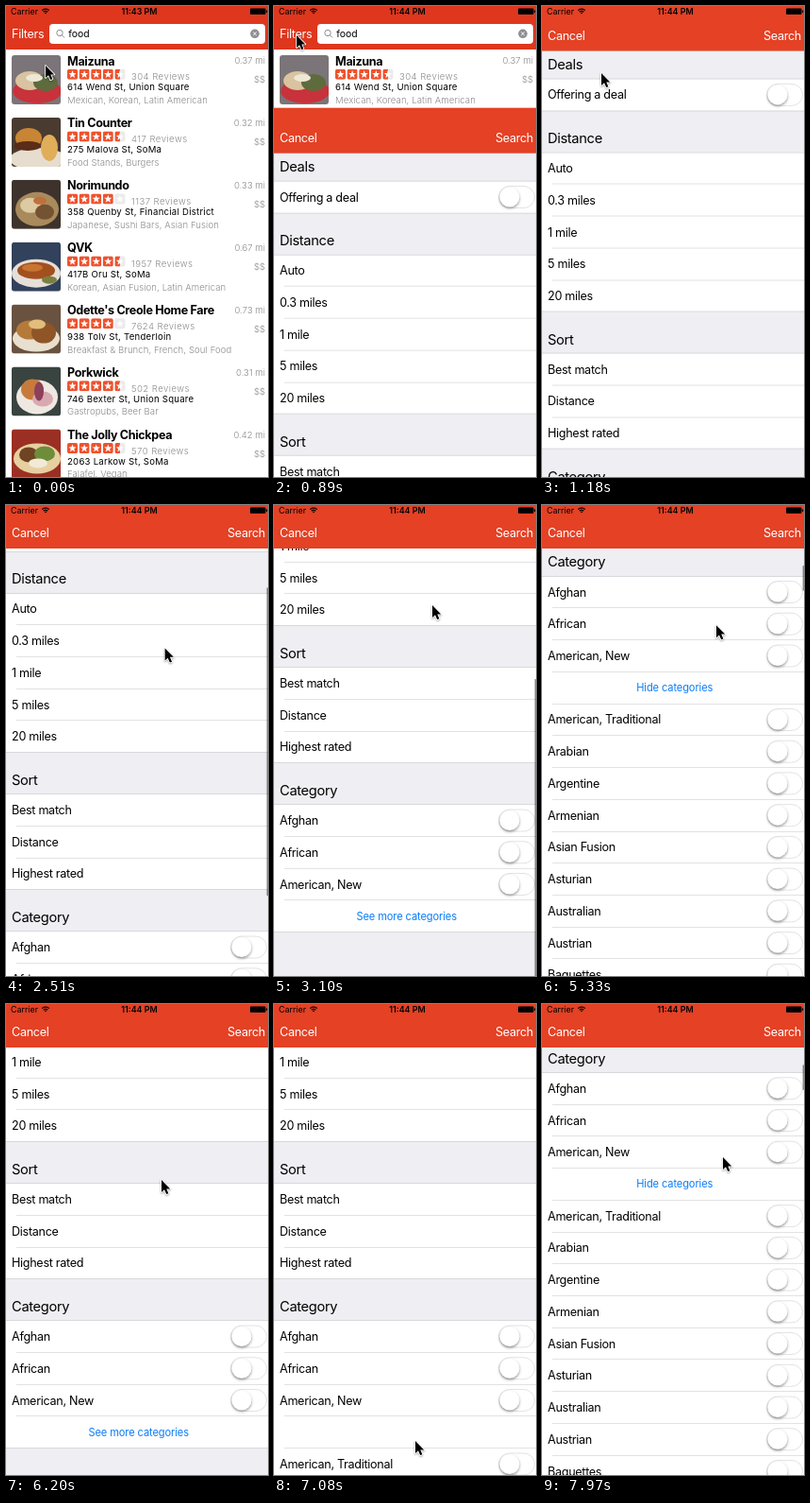
Animation, 278 px wide and 498 px high, one loop 8000 ms. Source, as an HTML page with a canvas:

```html
<!DOCTYPE html>
<html lang="en">
<head>
<meta charset="utf-8">
<title>Restaurant filters</title>
<style>
html, body { margin: 0; width: 100%; height: 100%; overflow: hidden; background: #fff; }
canvas { display: block; }
</style>
</head>
<body>
<canvas id="stage" width="278" height="498"></canvas>
<script>
const ctx = document.getElementById('stage').getContext('2d');
const W = 278, H = 498, LOOP = 8000, STEP = 147.4;
const BAR = 46, ROW = 33.73, HEAD = 43.9, PITCH = 65.9;
const REST = 176.1; // largest scroll offset while the categories are collapsed

const places = [
  ['Maizuna', '614 Wend St, Union Square', 'Mexican, Korean, Latin American', 4.5, 304, '0.37'],
  ['Tin Counter', '275 Malova St, SoMa', 'Food Stands, Burgers', 4.5, 417, '0.32'],
  ['Norimundo', '358 Quenby St, Financial District', 'Japanese, Sushi Bars, Asian Fusion', 4, 1137, '0.33'],
  ['QVK', '417B Oru St, SoMa', 'Korean, Asian Fusion, Latin American', 4.5, 1957, '0.67'],
  ["Odette's Creole Home Fare", '938 Tolv St, Tenderloin', 'Breakfast & Brunch, French, Soul Food', 4, 7624, '0.73'],
  ['Porkwick', '746 Bexter St, Union Square', 'Gastropubs, Beer Bar', 4.5, 502, '0.31'],
  ['The Jolly Chickpea', '2063 Larkow St, SoMa', 'Falafel, Vegan', 4.5, 570, '0.42'],
];

// Thumbnails: background, then ellipses as [x, y, rx, ry, colour]
const thumbs = [
  ['#7b7478', [27, 38, 26, 13, '#c8323a'], [19, 27, 15, 10, '#d9c3a0'], [36, 29, 13, 9, '#5d6b3d'], [24, 24, 9, 4, '#efe7d6']],
  ['#4a3b30', [28, 44, 30, 12, '#e6ddcf'], [18, 22, 14, 11, '#c98536'], [17, 30, 14, 5, '#5b2c17'], [40, 32, 9, 14, '#e0ad58']],
  ['#3d332c', [27, 31, 23, 18, '#a98a5c'], [20, 27, 11, 8, '#dccaa2'], [35, 34, 10, 8, '#745333'], [30, 22, 7, 4, '#c0703b']],
  ['#32415c', [26, 33, 26, 15, '#e4dfd8'], [26, 30, 20, 9, '#a3501f'], [22, 27, 11, 4, '#c87531'], [40, 40, 8, 4, '#78813f']],
  ['#6a5240', [26, 36, 25, 14, '#e8dfce'], [19, 27, 14, 10, '#b57a3a'], [34, 30, 13, 11, '#8f5527'], [27, 21, 9, 5, '#e2bd7c']],
  ['#39433f', [27, 32, 22, 18, '#eee8e2'], [22, 24, 12, 11, '#c67b3c'], [33, 34, 11, 8, '#d9a9b1'], [29, 26, 5, 10, '#8d3f5b']],
  ['#9b2f23', [27, 31, 25, 16, '#e7cf9f'], [18, 27, 10, 8, '#6f4423'], [35, 26, 11, 8, '#6d8d3b'], [28, 36, 10, 5, '#f2e9d7']],
];

const categories = ['Afghan', 'African', 'American, New', null, 'American, Traditional', 'Arabian',
  'Argentine', 'Armenian', 'Asian Fusion', 'Asturian', 'Australian', 'Austrian', 'Baguettes', 'Bangladeshi'];

// [time, x, y]
const cursorKeys = [[300, 42, 62], [600, 24, 30], [880, 24, 30], [1179, 63, 70], [1326, 168, 406],
  [1760, 169, 179], [1910, 169, 179], [2060, 169, 177], [2300, 169, 177], [2800, 168, 105], [3400, 168, 105],
  [3900, 150, 453], [4150, 150, 453], [4420, 202, 393], [4600, 202, 393], [4865, 186, 130], [5160, 186, 130],
  [5300, 185, 126], [5500, 178, 190], [5800, 178, 190], [6180, 165, 185], [6300, 165, 185],
  [6800, 150, 461], [7080, 150, 461], [7365, 195, 423], [7400, 195, 423], [7955, 192, 161]];
// [time, offset]
const scrollKeys = [[2280, 0], [2500, 60], [2800, 160], [3090, 194.1], [3550, REST], [4600, REST], [4865, 432],
  [5160, 432], [5300, 435.6], [5600, 435.6], [6000, REST], [7400, REST], [7955, 438.4]];

function track(keys, t, i = 1) {
  const next = keys.findIndex(k => k[0] > t);
  if (next === 0) return keys[0][i];
  if (next < 0) return keys[keys.length - 1][i];
  const a = keys[next - 1], b = keys[next];
  const p = (t - a[0]) / (b[0] - a[0]);
  return a[i] + (b[i] - a[i]) * p * p * (3 - 2 * p);
}

function text(str, x, cy, size, { color = '#000', weight = 400, align = 'left', spacing = 0 } = {}) {
  ctx.font = `${weight} ${size}px Inter, Roboto, sans-serif`;
  ctx.letterSpacing = spacing * size + 'px';
  ctx.textAlign = align;
  ctx.fillStyle = color;
  ctx.fillText(str, x, cy + size * .36);
}

function rect(x, y, w, h, color) {
  ctx.fillStyle = color;
  ctx.fillRect(x, y, w, h);
}

function round(x, y, w, h, r, color) {
  ctx.beginPath();
  ctx.roundRect(x, y, w, h, r);
  ctx.fillStyle = color;
  ctx.fill();
}

function ellipse(x, y, rx, ry, color) {
  ctx.beginPath();
  ctx.ellipse(x, y, rx, ry, 0, 0, 7);
  ctx.fillStyle = color;
  ctx.fill();
}

function line(points, color, width = 1) {
  ctx.beginPath();
  points.forEach(([x, y]) => ctx.lineTo(x, y));
  ctx.strokeStyle = color;
  ctx.lineWidth = width;
  ctx.stroke();
}

function clipped(addPath, draw) {
  ctx.save();
  ctx.beginPath();
  addPath();
  ctx.clip();
  draw();
  ctx.restore();
}

function starBox(x, y, color) {
  round(x, y, 11, 11, 2, color);
  ctx.beginPath();
  for (let i = 0; i < 10; i++) {
    const a = (i / 5 - .5) * Math.PI, r = i % 2 ? 1.8 : 4.3;
    ctx.lineTo(x + 5.5 + r * Math.cos(a), y + 5.7 + r * Math.sin(a));
  }
  ctx.fillStyle = '#fff';
  ctx.fill();
}

function rating(x, y, stars) {
  for (let i = 0; i < 5; i++) {
    const left = x + i * 12.6, part = Math.min(1, Math.max(0, stars - i));
    starBox(left, y, '#ebebeb');
    clipped(() => ctx.rect(left, y, 11 * part, 11), () => starBox(left, y, '#f0512c'));
  }
}

function thumbnail([background, ...shapes], x, y) {
  clipped(() => ctx.roundRect(x, y, 52, 52, 3), () => {
    rect(x, y, 52, 52, background);
    shapes.forEach(([dx, dy, rx, ry, color]) => ellipse(x + dx, y + dy, rx, ry, color));
  });
}

function drawList() {
  rect(0, 0, W, H, '#fff');
  places.forEach(([name, address, kinds, stars, reviews, miles], i) => {
    const y = 58 + i * PITCH;
    const light = { color: '#8c8c8c', weight: 300 }, right = { ...light, align: 'right' };
    thumbnail(thumbs[i], 6, y - 6);
    text(name, 65, y, 12.6, { weight: 700, spacing: -.028 });
    rating(65, y + 8.7, stars);
    text(reviews + ' Reviews', 133, y + 17, 9.6, { ...light, spacing: .045 });
    text(address, 65, y + 28, 9.6, { spacing: .025 });
    text(kinds, 65, y + 41.5, 9.6, { ...light, spacing: .008 });
    text(miles + ' mi', 275, y, 9.6, right);
    text('$$', 275, y + 20, 9.6, right);
  });
  rect(0, 0, W, BAR, '#de371e');
  text('Filters', 6, 29.5, 12.6, { color: '#fff', spacing: -.024 });
  round(46, 19, 229, 21, 4, '#fff');
  ctx.beginPath();
  ctx.arc(57, 28.5, 3.2, 0, 7);
  ctx.strokeStyle = '#8e8e93';
  ctx.lineWidth = 1;
  ctx.stroke();
  line([[59.3, 30.8], [62, 33.5]], '#8e8e93');
  text('food', 66.3, 29.5, 10.4);
  ellipse(264, 29.3, 4.8, 4.8, '#8e8e93');
  line([[262.2, 27.5], [265.8, 31.1]], '#fff');
  line([[265.8, 27.5], [262.2, 31.1]], '#fff');
}

function toggle(cy) {
  round(238.5, cy - 11.5, 38, 23, 11.5, '#fff');
  ctx.strokeStyle = '#e3e3e3';
  ctx.lineWidth = 1;
  ctx.stroke();
  ctx.save();
  ctx.shadowColor = 'rgba(0,0,0,.4)';
  ctx.shadowBlur = 3;
  ctx.shadowOffsetY = 1.5;
  ellipse(250, cy, 10.5, 10.5, '#fff');
  ctx.restore();
}

// Draws one group of rows and returns the y below it
function section(title, rows, y, head, drawRow) {
  const top = y + head, bottom = top + rows.length * ROW;
  text(title, 6, top - 15, 14.7, { spacing: -.024 });
  rect(0, top, W, bottom - top, '#fff');
  rows.forEach((row, i) => {
    if (i) rect(11, Math.floor(top + i * ROW), W, 1, '#e2e2e4');
    drawRow(row, top + (i + .5) * ROW);
  });
  for (const edge of [top, bottom]) rect(0, Math.floor(edge), W, 1, '#d8d8dc');
  return bottom;
}

function drawFilters(t) {
  const scroll = track(scrollKeys, t);
  const open = (t > 4050 && t < 5600) || t > 6980;
  const changed = t > 6980 ? 6980 : t > 5600 ? 5600 : t > 4050 ? 4050 : -1e3;
  const linkAlpha = Math.min(1, Math.max(0, (t - changed - 130) / 150));

  const label = (row, cy) => text(row, 6, cy, 12.6, { spacing: -.024 });
  const option = (row, cy) => { label(row, cy); toggle(cy); };
  const category = (row, cy) => {
    if (row) return option(row, cy);
    ctx.globalAlpha = linkAlpha;
    text(open ? 'Hide categories' : 'See more categories', 140.7, cy, 11.1,
      { color: '#0a7cf8', align: 'center', spacing: -.01 });
    ctx.globalAlpha = 1;
  };

  rect(0, 0, W, H, '#eeeef3');
  let y = BAR - scroll;
  y = section('Deals', ['Offering a deal'], y, 29.5, option);
  y = section('Distance', ['Auto', '0.3 miles', '1 mile', '5 miles', '20 miles'], y, HEAD, label);
  y = section('Sort', ['Best match', 'Distance', 'Highest rated'], y, HEAD, label);
  section('Category', open ? categories : categories.slice(0, 4), y, HEAD, category);

  if ((t > 2300 && t < 3600) || (t > 4600 && t < 6100) || t > 7400) {
    const view = H - BAR, content = open ? 9800 : 627;
    round(276.6, BAR + scroll / content * view - 2, 1.4, Math.max(26.7, view * view / content), .7, 'rgba(0,0,0,.45)');
  }

  rect(0, -2, W, BAR + 2, '#e44125');
  text('Cancel', 6, 29.5, 12.6, { color: '#fff', spacing: -.024 });
  text('Search', 275, 29.5, 12.6, { color: '#fff', spacing: -.024, align: 'right' });
}

function drawStatus(clock) {
  text('Carrier', 5, 5.6, 8.9);
  ctx.strokeStyle = '#000';
  ctx.lineWidth = 1.2;
  for (const r of [1, 3.2, 5.4]) {
    ctx.beginPath();
    ctx.arc(42, 8.5, r, -Math.PI * .75, -Math.PI * .25);
    ctx.stroke();
  }
  text(clock, 141.5, 5.6, 8.9, { weight: 600, align: 'center' });
  round(259, 2.5, 16.5, 6.5, 1.2, '#000');
  rect(276, 4.5, 1.2, 2.5, '#000');
}

function drawCursor(x, y) {
  const shape = [[0, 0], [0, 15.5], [3.6, 12.2], [6.2, 18], [8.8, 16.9], [6.3, 11.2], [11, 11.2]];
  ctx.save();
  ctx.translate(x, y + 1);
  ctx.scale(.84, .84);
  ctx.shadowColor = 'rgba(0,0,0,.35)';
  ctx.shadowBlur = 2;
  ctx.shadowOffsetY = 1;
  ctx.beginPath();
  shape.forEach(p => ctx.lineTo(...p));
  ctx.closePath();
  ctx.lineJoin = 'round';
  ctx.lineWidth = 2;
  ctx.strokeStyle = '#fff';
  ctx.stroke();
  ctx.shadowColor = 'transparent';
  ctx.fillStyle = '#000';
  ctx.fill();
  ctx.restore();
}

function draw(now) {
  const t = Math.floor(now % LOOP / STEP) * STEP;
  const presenting = t > 780;
  const slide = H * Math.exp((780 - t) / 69);
  if (!presenting || slide > .3) drawList();
  if (presenting) {
    ctx.save();
    ctx.translate(0, slide > .3 ? slide : 0);
    drawFilters(t);
    ctx.restore();
  }
  drawStatus(presenting ? '11:44 PM' : '11:43 PM');
  drawCursor(track(cursorKeys, t, 1), track(cursorKeys, t, 2));
}

let start;
function frame(now) {
  start ??= now;
  draw(now - start);
  requestAnimationFrame(frame);
}
requestAnimationFrame(frame);
</script>
</body>
</html>
```
